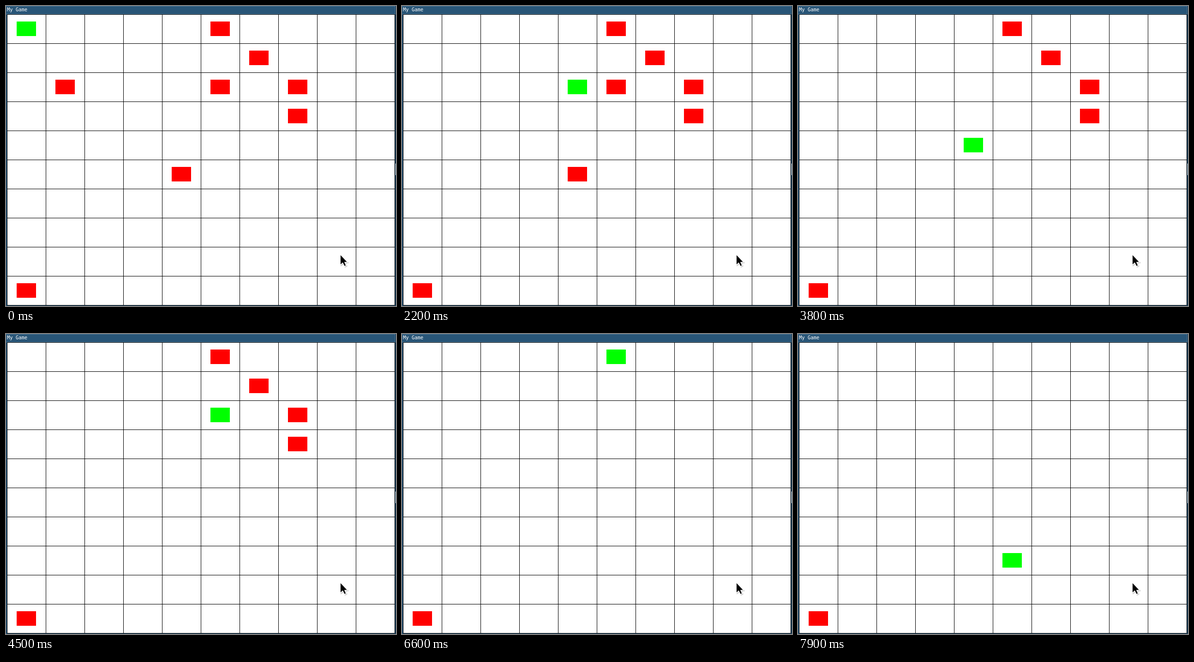
Recreate the animation shown at these times as an HTML page. Size 805x619 px, loop 8000 ms.

```html
<!DOCTYPE html>
<html lang="en">
<head>
<meta charset="utf-8">
<title>My Game</title>
<style>
  html, body { margin: 0; width: 100%; height: 100%; overflow: hidden; background: #285577; }
  svg { display: block; }
  text { font: 10px "DejaVu Sans Mono", monospace; fill: #fff; }
</style>
</head>
<body>
<svg width="805" height="619" viewBox="0 0 805 619">
  <rect width="805" height="619" fill="#285577"/>
  <path d="M0 .5H804M0 16.5H804M803.5 0V17" stroke="#4c7899"/>
  <text x="2" y="11">My Game</text>
  <rect x="2" y="17" width="801" height="601" fill="#fff"/>
  <path id="grid" stroke="#000"/>
  <path d="M804.5 0V619" stroke="#12283a"/>
  <path d="M804.5 325V349" stroke="#fff"/>
  <g id="food" fill="#f00"></g>
  <rect id="player" width="40" height="30" fill="#0f0"/>
  <g stroke-linejoin="round">
    <path d="M691.5 515V536L696.5 531.5 700 538.5 703.5 537 700.5 530H706.5Z" fill="#000" stroke="#000" stroke-width="2" opacity=".16"/>
    <path d="M690 512.5V534.5L695 530 698.5 537 702 535.5 699 528.5H705Z" fill="#000" stroke="#fff" stroke-width="1.2"/>
  </g>
</svg>
<script>
const LOOP = 8000;
const byId = id => document.getElementById(id);

let lines = "";
for (let i = 0; i <= 10; i++) {
  lines += `M${2.5 + 80 * i} 17V618M2 ${17.5 + 60 * i}H803`;
}
byId("grid").setAttribute("d", lines);

// Each run: direction, then the times of its one-cell steps
const runs = [
  ["D", 900, 1100], ["R", 1500, 1800, 2000, 2200, 2400],
  ["D", 2800, 3000, 3100], ["L", 3400], ["U", 3800, 4000, 4100],
  ["R", 4500, 4700, 4800], ["D", 5300], ["U", 5600],
  ["L", 5900], ["U", 6100], ["L", 6300], ["U", 6600],
  ["D", 6900, 7100, 7200, 7400, 7600, 7700, 7900]
];
const moves = { U: [0, -1], D: [0, 1], L: [-1, 0], R: [1, 0] };

const path = [{ time: 0, col: 0, row: 0 }];
for (const [dir, ...times] of runs) {
  const [dx, dy] = moves[dir];
  for (const time of times) {
    const { col, row } = path.at(-1);
    path.push({ time, col: col + dx, row: row + dy });
  }
}

function place(el, col, row) {
  el.setAttribute("x", 22 + 80 * col);
  el.setAttribute("y", 32 + 60 * row);
}

const cells = [[5, 0], [6, 1], [1, 2], [5, 2], [7, 2], [7, 3], [4, 5], [0, 9]];
const food = cells.map(([col, row]) => {
  const el = byId("player").cloneNode();
  el.removeAttribute("id");
  el.removeAttribute("fill");
  place(el, col, row);
  byId("food").append(el);
  const visit = path.find(p => p.col === col && p.row === row);
  return { el, eaten: visit ? visit.time : Infinity };
});

const start = performance.now();
function draw() {
  const t = (performance.now() - start) % LOOP;
  const { col, row } = path.findLast(p => p.time <= t);
  place(byId("player"), col, row);
  for (const { el, eaten } of food) {
    el.setAttribute("visibility", t < eaten ? "visible" : "hidden");
  }
  requestAnimationFrame(draw);
}
draw();
</script>
</body>
</html>
```
